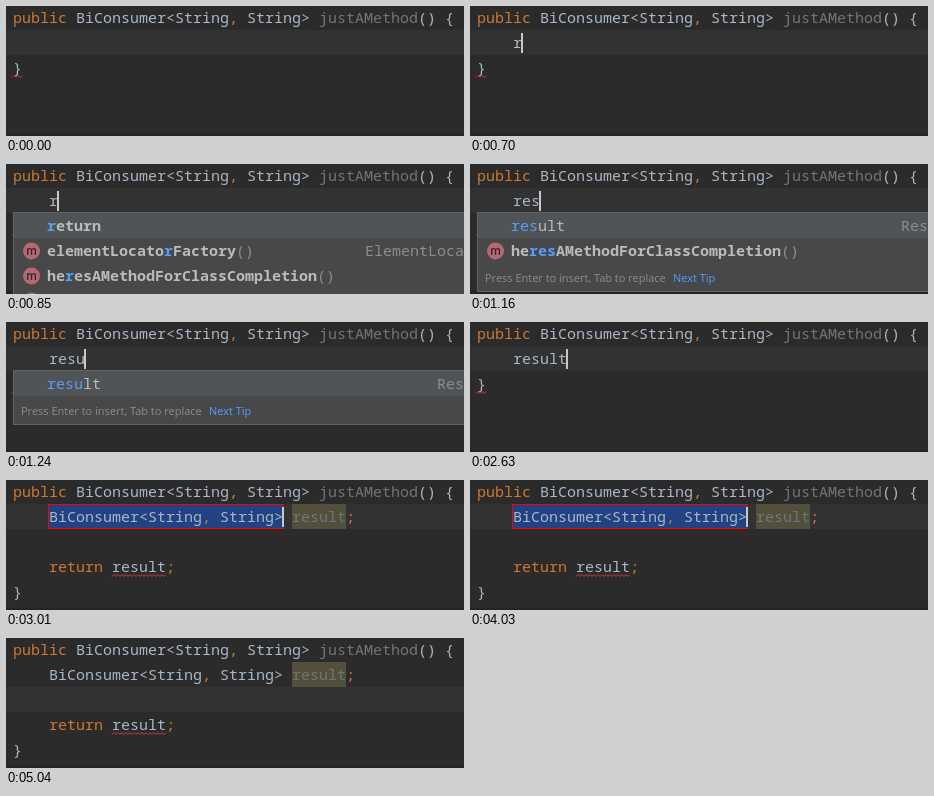
Recreate the animation shown at these times as an HTML page with a canvas. Size 458 by 130 pixels, loop 5500 ms.

```html
<!DOCTYPE html>
<html lang="en">
<head>
<meta charset="utf-8">
<title>Code completion</title>
<style>
  html, body { margin: 0; width: 100%; height: 100%; overflow: hidden; background: #2b2b2b; }
  canvas { display: block; width: 458px; height: 130px; }
</style>
</head>
<body>
<canvas id="stage"></canvas>
<script>
const W = 458, H = 130, LOOP = 5500;
const CHAR = 9, LINE = 25, LEFT = 7, INDENT = 43;
const MONO = '"Noto Sans Mono", "DejaVu Sans Mono", monospace';
const SANS = '"Open Sans", "Noto Sans", sans-serif';
const C = {
  bg: '#2b2b2b', row: '#323232', edge: '#242424', text: '#a9b7c6', key: '#cc7832',
  unused: '#72737a', warn: '#52503a', select: '#214283', frame: '#ff0000',
  error: '#d0403c', caret: '#c8c8c8', popup: '#46484a', picked: '#515457',
  border: '#616365', item: '#bbbbbb', dim: '#8c8c8c', match: '#589df6',
  icon: '#b56874', letter: '#2e2628'
};

// Completion entries: matched letters are given as [start, length]
const keyword = n => ({ name: 'return', bold: true, match: [0, n] });
const locator = { name: 'elementLocatorFactory', tail: '()', type: 'ElementLocator', typeX: 359, bold: true, icon: true, match: [13, 1] };
const helper = n => ({ name: 'heresAMethodForClassCompletion', tail: '()', bold: true, icon: true, match: [2, n] });
const result = n => ({ name: 'result', type: 'Result', typeX: 431, match: [0, n] });
const more = { name: '', icon: true, match: [0, 0] };

const only = { typed: 'resu', items: [result(4)], hint: true };
const filled = { done: true, box: true };
const marked = { done: true, box: true, warn: true, clean: true };
const final = { done: true, warn: true, clean: true, line: 2 };

const STEPS = [
  [0, { typed: '' }],
  [70, { typed: '', caret: true }],
  [530, { typed: '' }],
  [700, { typed: 'r', caret: true }],
  [850, { typed: 'r', caret: true, items: [keyword(1), locator, helper(1), more] }],
  [930, { typed: 're', caret: true, items: [keyword(2), helper(2)], hint: true }],
  [1160, { typed: 'res', caret: true, items: [result(3), helper(3)], hint: true }],
  [1240, { ...only, caret: true }],
  [2000, only],
  [2550, { ...only, caret: true }],
  [2630, { typed: 'result', caret: true }],
  [2710, { ...filled, caret: true }],
  [2950, { ...filled, warn: true, caret: true }],
  [3010, { ...marked, caret: true }],
  [3560, marked],
  [4030, { ...marked, caret: true }],
  [4190, { ...final, caret: true }],
  [5040, final]
];

const canvas = document.getElementById('stage');
const ctx = canvas.getContext('2d');
const ratio = window.devicePixelRatio || 1;
canvas.width = W * ratio;
canvas.height = H * ratio;
ctx.scale(ratio, ratio);

function rect(x, y, w, h, color) {
  ctx.fillStyle = color;
  ctx.fillRect(x, y, w, h);
}

// Monospaced text on the editor's character grid; returns the next x
function mono(text, x, y, color, bold) {
  ctx.font = (bold ? 'bold ' : '') + '15px ' + MONO;
  ctx.fillStyle = color;
  for (const ch of text) {
    ctx.fillText(ch, x, y);
    x += CHAR;
  }
  return x;
}

function spans(parts, x, line) {
  for (const [text, color] of parts) x = mono(text, x, 17 + line * LINE, color);
}

function squiggle(x, width, line) {
  const y = 19.5 + line * LINE;
  ctx.beginPath();
  for (let i = 0; i <= width; i += 2) ctx.lineTo(x + i, y + (i % 4 ? 0 : 2));
  ctx.strokeStyle = C.error;
  ctx.lineWidth = 1;
  ctx.stroke();
}

const typeSpans = [['BiConsumer<String', C.text], [',', C.key], [' String>', C.text]];

function drawIcon(y) {
  ctx.beginPath();
  ctx.arc(25.5, y, 8.5, 0, Math.PI * 2);
  ctx.fillStyle = C.icon;
  ctx.fill();
  ctx.font = '500 12px Inter, sans-serif';
  ctx.fillStyle = C.letter;
  ctx.textAlign = 'center';
  ctx.fillText('m', 25.5, y + 3.5);
  ctx.textAlign = 'left';
}

function drawPopup({ items, hint }) {
  const listEnd = 49 + items.length * LINE;
  const bottom = listEnd + (hint ? 28 : 0);
  rect(LEFT, 48, W, bottom + 1 - 48, C.border);
  rect(LEFT + 1, 49, W, bottom - 49, C.popup);
  rect(LEFT + 1, 49, W, LINE, C.picked);
  items.forEach(({ name, tail = '', type, typeX, bold, icon, match }, i) => {
    const y = 67 + i * LINE, [from, count] = match;
    if (icon) drawIcon(y - 5);
    let x = mono(name.slice(0, from), 41, y, C.item, bold);
    x = mono(name.slice(from, from + count), x, y, C.match, bold);
    x = mono(name.slice(from + count), x, y, C.item, bold);
    mono(tail, x, y, C.dim);
    if (type) mono(type, typeX, y, C.dim);
  });
  if (!hint) return;
  ctx.font = '11px ' + SANS;
  ctx.fillStyle = C.dim;
  ctx.fillText('Press Enter to insert, Tab to replace', 15, listEnd + 19);
  ctx.fillStyle = C.match;
  ctx.fillText('Next Tip', 203, listEnd + 19);
}

function drawBody(s) {
  if (s.box) rect(42, 24, 236, 25, C.select);
  if (s.warn) rect(286, 24, 54, 25, C.warn);
  spans([...typeSpans, [' ', C.text], ['result', s.warn ? C.unused : C.text], [';', C.key]], INDENT, 1);
  spans([['return ', C.key], ['result', C.text], [';', C.key]], INDENT, 3);
  if (s.clean) squiggle(106, 54, 3);
  if (s.box) {
    ctx.strokeStyle = C.frame;
    ctx.lineWidth = 1;
    ctx.strokeRect(42.5, 24.5, 234, 24);
  }
}

function draw(s) {
  const line = s.line || 1, last = s.done ? 4 : 2;
  rect(0, 0, W, H, C.bg);
  rect(0, line * LINE - 1, W, LINE, C.row);
  rect(0, 128, W, 2, C.edge);
  spans([['public ', C.key], ...typeSpans, [' ', C.text], ['justAMethod', C.unused], ['() {', C.text]], LEFT, 0);
  spans([['}', C.text]], LEFT, last);
  if (!s.clean) squiggle(6, 10, last);
  if (s.done) drawBody(s);
  else mono(s.typed, INDENT, 42, C.text);
  if (s.items) drawPopup(s);
  if (s.caret) {
    const column = s.box ? 26 : s.done ? 0 : s.typed.length;
    rect(42 + column * CHAR, 2 + line * LINE, 2, 20, C.caret);
  }
}

const start = performance.now();
let shown = null;
function tick(now) {
  const t = Math.max(0, now - start) % LOOP;
  const [, state] = STEPS.findLast(([at]) => at <= t);
  if (state !== shown) draw(shown = state);
  requestAnimationFrame(tick);
}
tick(start);
</script>
</body>
</html>
```
